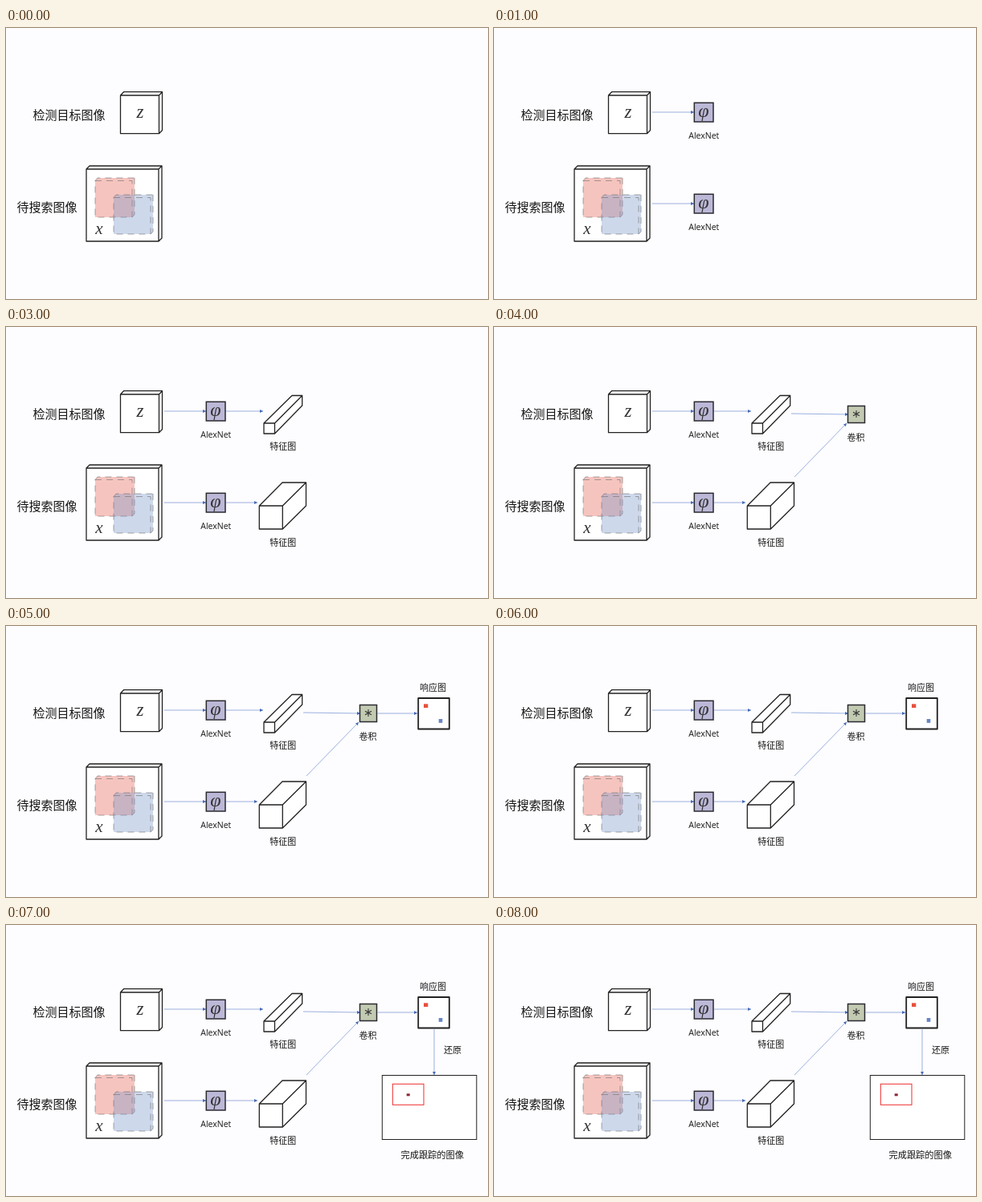
These frames come from a looping animation (600x338 px, 9000 ms). An HTML page:

```html
<!DOCTYPE html>
<html lang="zh-CN">
<head>
<meta charset="utf-8">
<title>目标跟踪流程</title>
<style>
html, body { margin: 0; width: 100%; height: 100%; overflow: hidden; background: #fdfcfe; }
svg { display: block; width: 100%; height: 100%; }
text { font: 11px "Noto Sans CJK SC", "Noto Sans CJK", sans-serif; fill: #161616; }
.input { font-size: 15px; }
.net { font: 10.5px "Open Sans", "Noto Sans", sans-serif; text-anchor: middle; }
.math { font: italic 21px "Liberation Serif", serif; text-anchor: middle; fill: #333; }
.solid { fill: #fff; stroke: #222; stroke-width: 1.3; stroke-linejoin: round; }
.op { stroke: #2a2a30; stroke-width: 1.5; }
.arrow { fill: none; stroke: #8fa9dc; stroke-width: 0.9; marker-end: url(#head); }
.dash { stroke: #777; stroke-opacity: .65; stroke-width: 1; stroke-dasharray: 8 6; }

/* Each stage switches on abruptly and stays until the loop restarts. */
.stage { animation: 9s step-end infinite; }
.extract { animation-name: at1; }
.features { animation-name: at3; }
.correlate { animation-name: at4; }
.response { animation-name: at5; }
.result { animation-name: at7; }
@keyframes at1 { 0% { opacity: 0 } 11.11%, 100% { opacity: 1 } }
@keyframes at3 { 0% { opacity: 0 } 33.33%, 100% { opacity: 1 } }
@keyframes at4 { 0% { opacity: 0 } 44.44%, 100% { opacity: 1 } }
@keyframes at5 { 0% { opacity: 0 } 55.55%, 100% { opacity: 1 } }
@keyframes at7 { 0% { opacity: 0 } 77.77%, 100% { opacity: 1 } }
</style>
</head>
<body>
<svg viewBox="0 0 600 338">
  <defs>
    <marker id="head" markerUnits="userSpaceOnUse" markerWidth="5" markerHeight="5" refX="4" refY="2.5" orient="auto">
      <path d="M0 .5 L4 2.5 L0 4.5Z" fill="#4469b7"/>
    </marker>
    <g id="phi">
      <path class="arrow" d="M197 105H249"/>
      <rect class="op" x="249.3" y="93.3" width="23.7" height="23.7" fill="#bcb8d7"/>
      <text class="math" x="261" y="110.5" style="font-size:24px">φ</text>
      <text class="net" x="261.3" y="137.7">AlexNet</text>
    </g>
    <g id="patch">
      <path d="M0 3.5L3 0H49V46L46 49H0Z" stroke="none"/>
      <path class="dash" fill="none" d="M0 3.5H46V49H0ZM0 3.5L3 0H49L46 3.5M49 0V46L46 49"/>
    </g>
  </defs>

  <text class="input" x="33.5" y="113.5">检测目标图像</text>
  <path class="solid" d="M142.5 84L146.5 79.7H194.5V127.5L190.5 131.7H142.5ZM142.5 84H190.5V131.7M190.5 84L194.5 79.7"/>
  <text class="math" x="167" y="112" style="font-size:23px">z</text>

  <text class="input" x="13.5" y="228.5">待搜索图像</text>
  <path class="solid" d="M100 176L104 172H194V262L190 266H100ZM100 176H190V266M190 176L194 172"/>
  <use href="#patch" x="111" y="187" fill="#ed8980" fill-opacity=".5"/>
  <use href="#patch" x="134" y="208" fill="#7694c8" fill-opacity=".36"/>
  <text class="math" x="116" y="257">x</text>

  <g class="stage extract">
    <use href="#phi"/>
    <use href="#phi" y="114"/>
  </g>

  <g class="stage features">
    <path class="arrow" d="M274 105H320"/>
    <path class="solid" d="M321 120L356 85.5H368.7V98L334.5 133H321ZM321 120H334.5V133M334.5 120L368.7 85.5"/>
    <text x="328.3" y="153">特征图</text>
    <path class="arrow" d="M274 219H313"/>
    <path class="solid" d="M315.3 223L344 194H373.5V223L344.3 252H315.3ZM315.3 223H344.3V252M344.3 223L373.5 194"/>
    <text x="328.3" y="272.7">特征图</text>
  </g>

  <g class="stage correlate">
    <path class="arrow" d="M370 108L441 109"/>
    <path class="arrow" d="M374 187L439 120"/>
    <rect class="op" x="440.5" y="98.5" width="21" height="21" fill="#c2cab2"/>
    <path d="M451 104V113M447 106.3L455 110.7M447 110.7L455 106.3" stroke="#333" stroke-width="1.1"/>
    <text x="439.5" y="142">卷积</text>
  </g>

  <g class="stage response">
    <path class="arrow" d="M462 109H512"/>
    <rect class="solid" x="513.2" y="90" width="38.6" height="38.5" style="stroke-width:1.8"/>
    <rect x="520" y="97.3" width="5.3" height="4.7" fill="#e5523f"/>
    <rect x="538.7" y="116" width="4.6" height="4.8" fill="#6884c6"/>
    <text x="515" y="81">响应图</text>
  </g>

  <g class="stage result">
    <path class="arrow" d="M533 129.5V187"/>
    <text x="545" y="160">还原</text>
    <rect x="468.3" y="187.5" width="117.5" height="80" fill="#fff" stroke="#222"/>
    <rect x="481.3" y="198.3" width="38.7" height="26" fill="none" stroke="#ee2c2c"/>
    <rect x="498.7" y="210.3" width="4" height="3" fill="#8e2734"/>
    <text x="491.5" y="291" style="font-size:11.2px">完成跟踪的图像</text>
  </g>
</svg>
</body>
</html>
```
